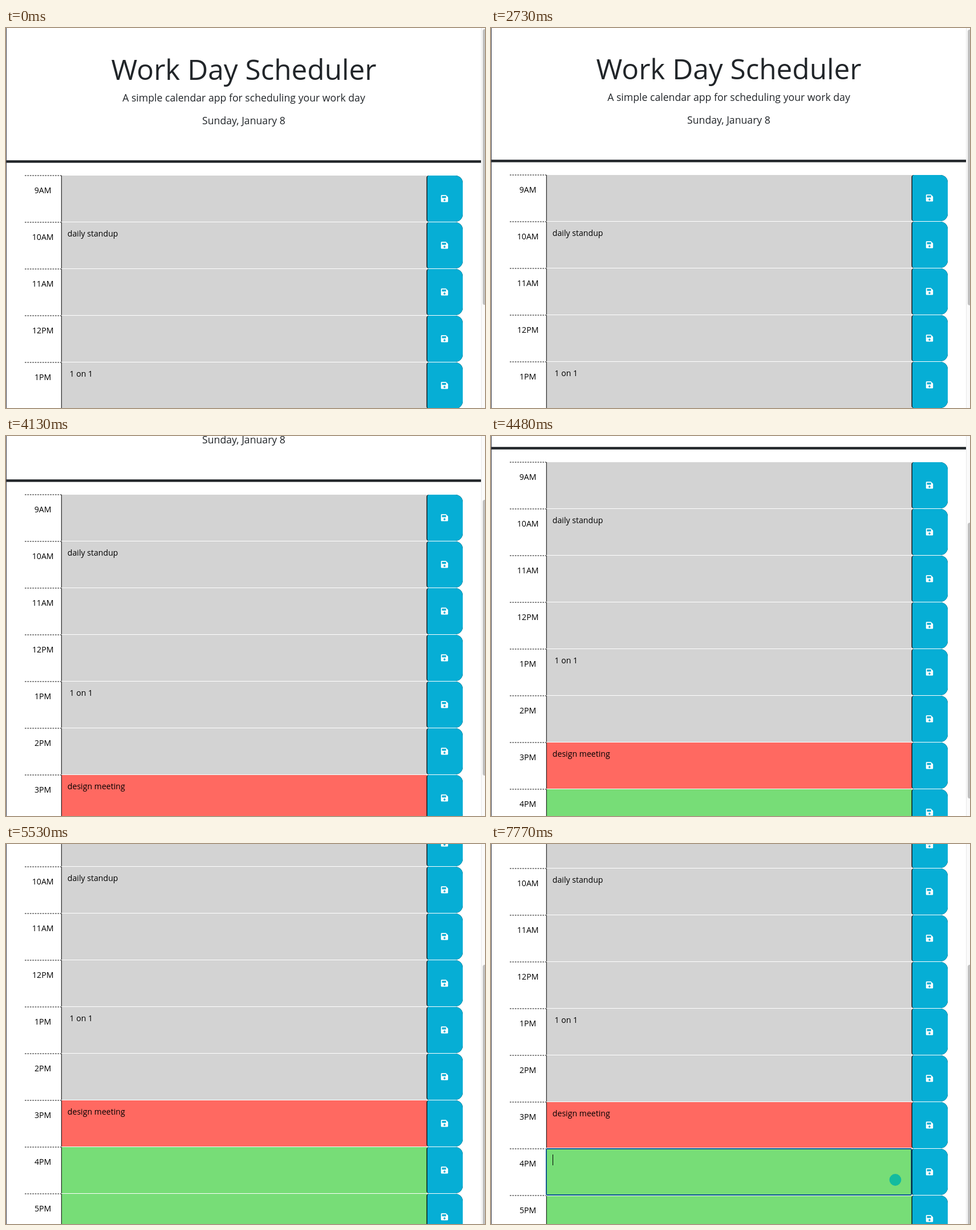
Write an HTML page that moves like this. It is 840x667 px and loops after 8 s.

```html
<!DOCTYPE html>
<html lang="en">
<head>
<meta charset="utf-8">
<title>Work Day Scheduler</title>
<style>
@property --scroll { syntax: "<number>"; inherits: true; initial-value: 0; }

html, body { margin: 0; width: 100%; height: 100%; overflow: hidden; background: #fff; }
svg {
  display: block; width: 840px; height: 667px;
  font: 14.13px "Open Sans", "Noto Sans", sans-serif;
  animation: scroll 8s steps(2) -1ms infinite;
}
#page { transform: translateY(calc(var(--scroll) * -1px)); }
#thumb { transform: translateY(calc(min(var(--scroll), 298) * .705px)); }

.head { fill: #212529; text-anchor: middle; }
.title { font-size: 49.47px; }
.lead { font-size: 17.67px; }
.hour { text-anchor: middle; }
.dash { stroke: #000; stroke-dasharray: 2.65 1.77; }
.past { fill: #d3d3d3; }
.present { fill: #ff6961; }
.future { fill: #77dd77; }
.save { fill: #06aed5; }
.disk { fill: #fff; fill-rule: evenodd; }

.ring { fill: none; animation: focus 8s step-end -1ms infinite; }
.caret { animation: blink 8s step-end -1ms infinite; }
.badge { fill: #13bb9f; animation: badge 8s steps(8) -1ms infinite; }

/* One step lasts 70 ms, or 0.875% of the loop. */
@keyframes scroll {
  0% { --scroll: 0; }
  33.25% { --scroll: 0; animation-timing-function: steps(1); }
  34.125% { --scroll: 1; }
  35.875% { --scroll: 10; }
  37.625% { --scroll: 38; }
  39.375% { --scroll: 74; }
  41.125% { --scroll: 109; }
  42.875% { --scroll: 142; }
  44.625% { --scroll: 155; }
  50.75% { --scroll: 155; animation-timing-function: steps(1); }
  51.625% { --scroll: 156; }
  53.375% { --scroll: 167; }
  55.125% { --scroll: 196; }
  56.875% { --scroll: 230; }
  58.625% { --scroll: 265; }
  60.375% { --scroll: 298; }
  62.125% { --scroll: 306; animation-timing-function: steps(4); }
  65.625% { --scroll: 304; animation-timing-function: steps(4); }
  69.125% { --scroll: 301; animation-timing-function: steps(4); }
  72.625% { --scroll: 299.2; animation-timing-function: steps(5); }
  77% { --scroll: 298.3; }
  78.75%, 100% { --scroll: 298; }
}
@keyframes focus {
  0% { opacity: 0; }
  84%, 100% { opacity: 1; }
}
@keyframes blink {
  0% { opacity: 0; }
  84% { opacity: 1; }
  91% { opacity: 0; }
  97.125%, 100% { opacity: 1; }
}
@keyframes badge {
  0%, 87.5% { opacity: 0; }
  94.5%, 100% { opacity: 1; }
}
</style>
</head>
<body>
<svg viewBox="0 0 840 667">
  <defs>
    <g id="button">
      <path d="M741.5 0H788a13 13 0 0 1 13 13V68a13 13 0 0 1-13 13H741.5a4 4 0 0 1-4-4V4a4 4 0 0 1 4-4Z"/>
      <path class="save" d="M742 0H788a13 13 0 0 1 13 13V68a13 13 0 0 1-13 13H742a3.2 4 0 0 1-3.2-4V4a3.2 4 0 0 1 3.2-4Z"/>
      <path class="disk" transform="translate(762.8 34.2) scale(.0277)"
        d="M48 0H314L448 134V400a48 48 0 0 1-48 48H48a48 48 0 0 1-48-48V48A48 48 0 0 1 48 0ZM64 64V192H320V64ZM224 256a64 64 0 1 0 .1 0Z"/>
    </g>
  </defs>
  <g id="page">
    <g class="head">
      <text class="title" x="417" y="91.3">Work Day Scheduler</text>
      <text class="lead" x="417" y="128.7">A simple calendar app for scheduling your work day</text>
      <text class="lead" x="417" y="169.3">Sunday, January 8</text>
      <rect y="232.2" width="833" height="4.4"/>
    </g>
    <g id="rows"></g>
  </g>
  <rect width="1" height="667" fill="#3a3d4c"/>
  <rect x="833" width="7" height="667" fill="#fafafa"/>
  <rect x="833" width="1" height="667" fill="#e8e8e8"/>
  <rect id="thumb" x="836" y="2" width="7" height="484" rx="3.5" fill="#c1c1c1"/>
</svg>
<script>
const hours = ["9AM", "10AM", "11AM", "12PM", "1PM", "2PM", "3PM", "4PM", "5PM"];
const notes = { "10AM": "daily standup", "1PM": "\u00a01 on 1", "3PM": "design meeting" };
const now = hours.indexOf("3PM");
const focused = hours.indexOf("4PM");

const focusMarks = `
  <g class="ring">
    <rect x="95.6" y="-1.4" width="643" height="83.8" rx="2.5" stroke="#fff"/>
    <rect x="97" y="0" width="640.2" height="81" rx="1.5" stroke="#0b5794" stroke-width="1.8"/>
  </g>
  <rect class="caret" x="108" y="10" width="1" height="19"/>
  <circle class="badge" cx="709" cy="54.5" r="10.4"/>`;

function row(hour, i) {
  const state = i < now ? "past" : i > now ? "future" : "present";
  return `<g transform="translate(0 ${259 + 82 * i})">
    <path class="dash" d="M33 0H97"/>
    <text class="hour" x="64.7" y="30.6">${hour}</text>
    <rect class="${state}" x="97" width="641" height="81"/>
    <rect x="96.8" width="1" height="81"/>
    <text x="107.8" y="25">${notes[hour] || ""}</text>
    ${i === focused ? focusMarks : ""}
    <use href="#button"/>
  </g>`;
}

// The focused row is painted last so that its ring stays on top.
const order = hours.map((_, i) => i).sort((a, b) => (a === focused) - (b === focused));
document.getElementById("rows").innerHTML = order.map(i => row(hours[i], i)).join("");
</script>
</body>
</html>
```
